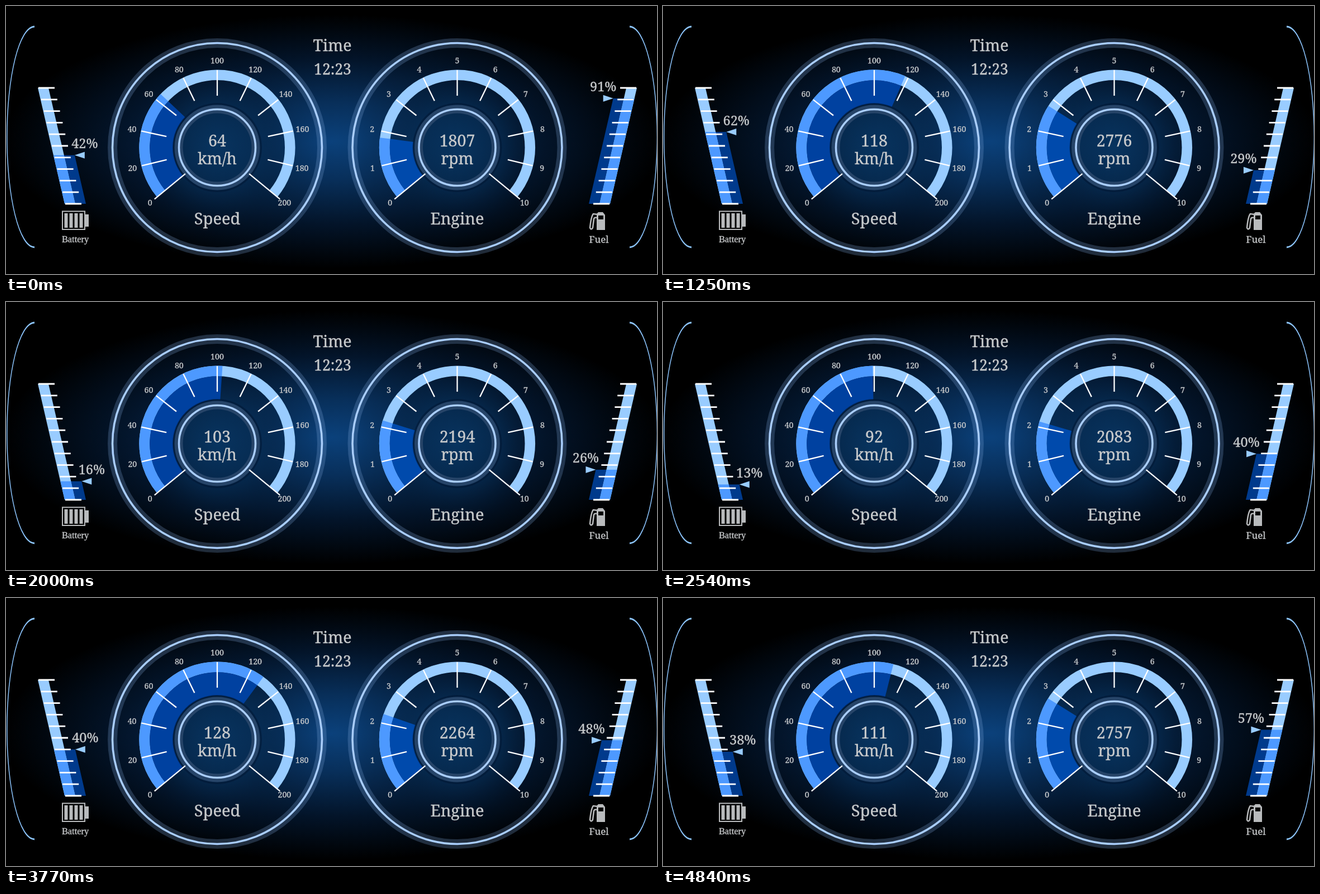
Animation of 1165 by 481 pixels, one loop 4.91 s. Source, as an HTML page:

```html
<!DOCTYPE html>
<html lang="en">
<head>
<meta charset="utf-8">
<title>Dashboard</title>
<style>
  html, body { margin: 0; width: 100%; height: 100%; overflow: hidden; background: #000; }
  svg { display: block; width: 1165px; height: 481px; }
  text {
    font-family: "Noto Serif", serif; font-weight: 500; text-anchor: middle;
    fill: #c8cacc; stroke: #c8cacc; stroke-width: .35px;
  }
  .tick { stroke: #fff; }
  .ring { fill: none; }
</style>
</head>
<body>
<svg id="stage" viewBox="0 0 1165 481">
  <defs>
    <radialGradient id="glow">
      <stop offset="0" stop-color="#0b417b"/>
      <stop offset=".3" stop-color="#082f5a"/>
      <stop offset=".65" stop-color="#031429"/>
      <stop offset="1" stop-color="#000"/>
    </radialGradient>
    <radialGradient id="face">
      <stop offset="0" stop-color="#083561" stop-opacity=".9"/>
      <stop offset=".4" stop-color="#062a4f" stop-opacity=".75"/>
      <stop offset=".75" stop-color="#02142a" stop-opacity=".15"/>
      <stop offset="1" stop-color="#010b17" stop-opacity="0"/>
    </radialGradient>
    <path id="bracket" fill="#8cc4fc"
      d="M51 35.6A50 199.4 0 0 0 51 434.4V431.6A48.5 196.6 0 0 1 51 38.4Z"/>
  </defs>
</svg>
<script>
const LOOP = 4910, LIGHT = '#99ccff', MID = '#4d99ff', RIM = '#a9cdfb';
const TOP = 147, BOTTOM = 355, SWEEP = 259;
const stage = document.getElementById('stage');

// Each track: tween duration, then [start time, value] pairs.
const tracks = {
  speed: [400, [0, 64], [230, 118], [1450, 103], [2400, 92], [3250, 128], [4150, 111]],
  rpm: [300, [0, 1807], [230, 2776], [1500, 2194], [2450, 2083], [3250, 2264], [4200, 2757]],
  battery: [300, [0, 42], [230, 62], [1500, 16], [2400, 10], [3250, 40], [4150, 38]],
  fuel: [300, [0, 91], [230, 71], [850, 29], [1500, 26], [2450, 71], [3250, 48], [4200, 57]]
};

function read(name, time) {
  const [duration, ...keys] = tracks[name];
  let i = keys.length - 1;
  while (i && keys[i][0] > time) i--;
  const [start, goal] = keys[i];
  const from = i ? keys[i - 1][1] : goal;
  return { goal, now: from + (goal - from) * Math.min(1, (time - start) / duration) };
}

const text = (x, y, size, content, extra = '') =>
  `<text x="${x}" y="${y}" font-size="${size}" ${extra}>${content}</text>`;

const ring = (r, width, color, extra = '') =>
  `<circle class="ring" r="${r}" stroke="${color}" stroke-width="${width}" ${extra}/>`;

const arc = (r, width, color, id = '') =>
  ring(r, width, color, `id="${id}" pathLength="360" stroke-dasharray="${SWEEP} 360"
    transform="rotate(${270 - SWEEP / 2})"`);

function dial(id, x, title, unit, step, wedge) {
  let marks = '';
  for (let i = 0; i <= 10; i++) {
    const angle = (i / 10 - .5) * SWEEP, a = angle * Math.PI / 180;
    const [inner, outer] = i % 10 ? [93, 139] : [74, 145.5];
    marks += `<path class="tick" stroke-width="2.3" d="M0 ${-inner}V${-outer}" transform="rotate(${angle})"/>`
      + text(156 * Math.sin(a), 5 - 156 * Math.cos(a), 14.2, i * step);
  }
  return `<g transform="translate(${x} 254)">
    <circle r="188" fill="url(#face)"/>
    ${ring(187.5, 17, '#7fa8dc', 'opacity=".25"')}${ring(187.5, 3.6, RIM)}
    ${arc(130.3, 18.6, LIGHT)}
    ${arc(100, 42, wedge, id + 'Wedge')}${arc(130.3, 18.6, MID, id + 'Band')}
    ${ring(78, 4, '#001530', 'opacity=".5"')}
    ${ring(69, 15, '#264468')}${ring(68.5, 3.6, RIM)}
    ${marks}
    ${text(0, -2, 28.5, '', `id="${id}Text"`)}
    ${text(0, 30, 28.5, unit)}${text(0, 138, 29, title)}
  </g>`;
}

const barX = y => 57 + 48 * (y - TOP) / (BOTTOM - TOP);

// Slanted strip from height y to the bottom, between two offsets.
const strip = (y, left, right) =>
  `M${barX(y) + left} ${y}H${barX(y) + right}L${105 + right} ${BOTTOM}H${105 + left}Z`;

function bar(id, mirror) {
  let ticks = '';
  for (let i = 0; i <= 10; i++) {
    const y = TOP + i * 20.8;
    ticks += `M${barX(y) + 1} ${y}h29`;
  }
  return `<g ${mirror}>
    <path fill="${LIGHT}" d="${strip(TOP, 0, 19)}"/>
    <path id="${id}Side" fill="#003a8c"/><path id="${id}Fill" fill="${MID}"/>
    <path class="tick" stroke-width="2.8" d="${ticks}"/>
    <path id="${id}Arrow" fill="${LIGHT}"/>
  </g>${text(0, 0, 23.5, '', `id="${id}Text"`)}`;
}

stage.insertAdjacentHTML('beforeend', `
  <ellipse cx="583" cy="243" rx="590" ry="228" fill="url(#glow)"/>
  <use href="#bracket"/><use href="#bracket" transform="translate(1167) scale(-1 1)"/>
  ${dial('speed', 378, 'Speed', 'km/h', 20, '#0041a0')}
  ${dial('rpm', 807.5, 'Engine', 'rpm', 1, '#004aac')}
  ${text(584, 81, 28.5, 'Time')}${text(584.5, 123, 26.5, '12:23')}
  ${bar('battery', '')}
  ${bar('fuel', 'transform="translate(1186) scale(-1 1)"')}
  <g fill="#b9bbbd">
    <path fill="none" stroke="#b9bbbd" stroke-width="2" d="M101 368.5H141V401H101Z"/>
    <path d="M104.5 372h6v26h-6zM113.5 372h6v26h-6zM122.5 372h6v26h-6zM131.5 372h6v26h-6zM141 374h7v22h-7z"/>
    <path fill-rule="evenodd" d="M1060 370H1068L1072 375V402H1057V373ZM1060 376V383H1069V376Z"/>
    <path fill="none" stroke="#b9bbbd" stroke-width="2.5" d="M1058 374L1051 373Q1047 378 1045 398Q1047 403 1050 398L1052 382Q1053 379 1057 380"/>
  </g>
  ${text(124, 424, 16.4, 'Battery', 'style="font-family:\'Liberation Serif\',serif"')}
  ${text(1061, 425, 17, 'Fuel')}`);

const el = id => document.getElementById(id);

function showDial(id, time, max) {
  const { goal, now } = read(id, time);
  for (const part of ['Wedge', 'Band'])
    el(id + part).setAttribute('stroke-dasharray', `${now / max * SWEEP} 360`);
  el(id + 'Text').textContent = goal;
}

function showBar(id, time, mirrored) {
  const { now } = read(id, time);
  const y = BOTTOM - (BOTTOM - TOP) * now / 100, tip = barX(y) + 38;
  el(id + 'Side').setAttribute('d', strip(y, 19, 38));
  el(id + 'Fill').setAttribute('d', strip(y, 0, 19));
  el(id + 'Arrow').setAttribute('d', `M${tip} ${y}l18 -6v12z`);
  const label = el(id + 'Text');
  label.textContent = Math.round(now) + '%';
  label.setAttribute('x', mirrored ? 1168 - tip : tip + 18);
  label.setAttribute('y', y - 12.5);
}

function draw() {
  const time = performance.now() % LOOP;
  showDial('speed', time, 200);
  showDial('rpm', time, 10000);
  showBar('battery', time, false);
  showBar('fuel', time, true);
  requestAnimationFrame(draw);
}
draw();
</script>
</body>
</html>
```
